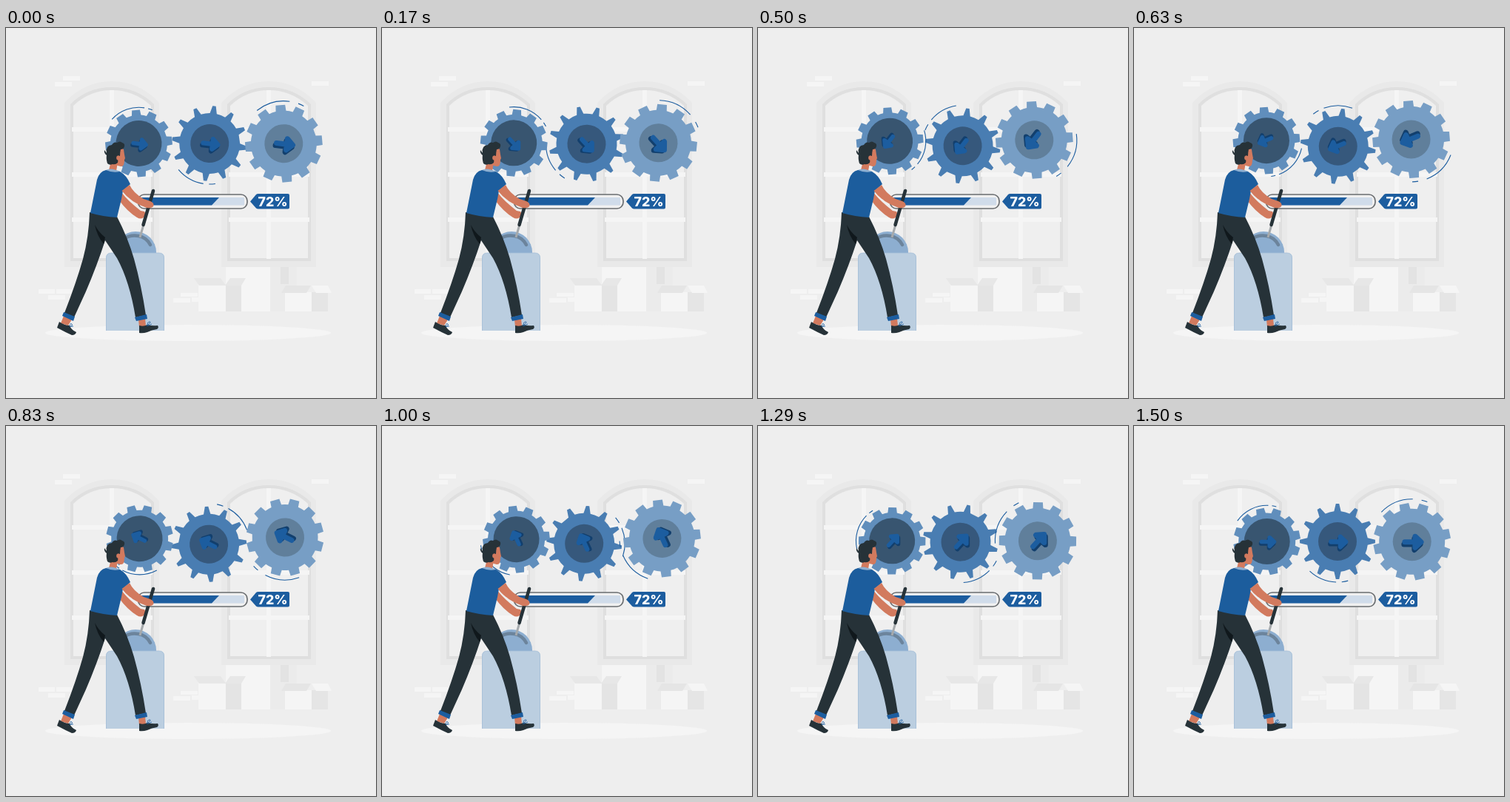
An HTML page that plays this animation: 500x500 px, repeating every 1.54 s.

```html
<!DOCTYPE html>
<html lang="en">
<head>
<meta charset="utf-8">
<title>Loading gears</title>
<style>
  html, body { margin: 0; height: 100%; overflow: hidden; background: #eee; }
  svg { display: block; width: 100vw; height: 100vh; }
  text { font: 800 17.8px Inter, "Open Sans", sans-serif; }
</style>
</head>
<body>
<svg viewBox="0 0 500 500">
  <defs>
    <g id="window">
      <path fill="#e9e9e9" d="M79 323V101Q106 72 143 72T207 101V323Z"/>
      <path fill="#dfdfdf" d="M87 315V103Q110 80 143 80T200 103V315Z"/>
      <path fill="#efefef" d="M91 311V105Q113 84 143 84T196 105V311Z"/>
      <path fill="none" stroke="#f5f5f5" stroke-width="6" d="M143 84V312M89 137H198M89 198H198M89 259H198"/>
    </g>
    <path id="arrow" fill="none" stroke-width="6.5" stroke-linecap="round" stroke-linejoin="round"
      d="M-10 0H9M3 -7L10.5 0L3 7Z"/>
  </defs>

  <path fill="#f5f5f5" d="M77 65h23v6h-23zM66 73h23v6h-23zM413 72h23v6h-23zM44 353h22v6h-22zM68 353h22v6h-22zM57 361h23v6h-23zM236 358h23v5h-23zM226 365h23v6h-23zM251 364h9v6h-9z"/>
  <use href="#window"/>
  <use href="#window" x="212"/>
  <ellipse cx="246" cy="412" rx="193" ry="11" fill="#f5f5f5"/>

  <g fill="#f5f5f5">
    <path d="M297 323H357V383H297Z"/>
    <path fill="#ebebeb" d="M357 323H393V383H357Z"/>
    <path fill="#e3e3e3" d="M371 323H382V346H371Z"/>
    <path d="M260 347H297V383H260Z"/>
    <path fill="#e4e4e4" d="M297 347H318V383H297Z"/>
    <path fill="#e7e7e7" d="M254 338H290L297 348H261ZM303 338H324L318 348H296Z"/>
    <path d="M377 357H413V383H377Z"/>
    <path fill="#e5e5e5" d="M413 357H435V383H413ZM378 348H412L406 358H372Z"/>
    <path d="M413 348H435L440 358H419Z"/>
  </g>

  <g id="gears"></g>

  <rect x="178.500" y="225" width="147.500" height="19" rx="8.500" fill="#f0f0f0" stroke="#6a6d70" stroke-width="1.700"/>
  <rect x="183" y="229" width="139" height="10.500" rx="1" fill="#d0dcea"/>
  <path fill="#1c5d9f" d="M183 229H288L278 239.500H183Z"/>
  <path fill="#1c5d9f" d="M330 234.500L338 225Q339 224 341 224H381Q383 224 383 226V242.500Q383 244.500 381 244.500H341Q339 244.500 338 243.500Z"/>
  <text x="360.500" y="240.800" text-anchor="middle" fill="#fff">72%</text>

  <circle cx="175" cy="303" r="28" fill="#8daed0"/>
  <path d="M159 285Q168 279 179 281Q190 283 195 293" fill="none" stroke="#6c849c" stroke-width="4.500" stroke-linecap="round"/>
  <path fill="#bbcee0" d="M135 409V311Q135 304 142 304H207Q214 304 214 311V409Z"/>
  <path d="M135.500 409V311Q135.500 304 142 304H207Q213.500 304 213.500 311V409" fill="none" stroke="#a5bed7" stroke-width=".8"/>
  <path d="M181 283L187 262" stroke="#a5a9ac" stroke-width="3"/>

  <g fill="#d27a5e">
    <path d="M156 222Q164 233 182 247L187 248Q190 252 186 256Q182 259 177 256Q164 248 153 233Z"/>
    <path d="M185.500 266L199 220" stroke="#263238" stroke-width="4.500" stroke-linecap="round"/>
    <path d="M78 389L89 394L84 402L74 399ZM179 394L188 392L189 403L180 404Z"/>
    <path fill="#263238" d="M72 397Q79 402 86 402Q88 408 95 411Q94 415 89 415Q80 411 69 405ZM180 402Q186 404 191 401Q198 403 205 402Q207 405 204 407Q197 408 191 411Q185 413 180 412Z"/>
    <path d="M86 402q1-4 3-2t-2 3t4 0M191 401q0-4 3-4t-2 4t5-1" fill="none" stroke="#1c5d9f" stroke-width=".8"/>
    <path fill="#263238" d="M113 249L150 255Q165 284 173 312Q183 348 189 388L175 391Q167 342 150 311L134 287Q123 321 108 356L92 391L79 385Q95 344 104 312Q112 282 113 249Z"/>
    <path fill="#10181c" d="M120 266Q125 276 134 283L132 292Q123 281 120 266Z"/>
    <path fill="#1c5d9f" d="M78 384L93 390L91 396L76 389ZM174 391L190 387L191 393L176 396Z"/>
    <path d="M142 180L151 182L149 193L139 192Z"/>
    <path d="M148 166Q154 159 159 164L160 171L161 176L160 178Q160 188 155 187Q151 187 148 184Z"/>
    <path fill="#263238" d="M137 183Q135 176 136 172Q132 169 133 165L136 169Q134 159 143 158Q146 153 150 155Q154 152 157 155Q161 156 160 160Q159 164 155 164Q154 168 154 173Q150 171 150 176Q152 178 151 182Q148 185 144 184Q140 186 137 183Z"/>
    <ellipse cx="151.500" cy="175.500" rx="2.300" ry="3"/>
    <path fill="#1c5d9d" d="M135 192Q126 194 123 205L114 250Q131 255 150 256L156 231L158 220L168 211Q163 199 154 194Q145 191 135 192Z"/>
    <path fill="#8daed0" d="M135 192Q142 188 154 194Q144 196 135 192Z"/>
    <path d="M156.500 220L167 212Q172 223 186 231L195 234Q200 236 199.500 240Q198 244 190 243Q169 236 156.500 220Z"/>
  </g>
</svg>

<script>
const point = (r, deg) => {
  const a = deg * Math.PI / 180;
  return `${(r * Math.cos(a)).toFixed(2)} ${(r * Math.sin(a)).toFixed(2)}`;
};
const arc = (r, from, to) => `M${point(r, from)}A${r} ${r} 0 0 1 ${point(r, to)}`;

// Twelve tapered teeth; base and tip are half-widths in degrees.
function gearPath({ root, outer, base, tip, phase }) {
  let d = "";
  for (let i = 0; i < 12; i++) {
    const a = i * 30 + phase;
    d += `${i ? `A${root} ${root} 0 0 1 ` : "M"}${point(root, a - base)}`;
    d += `L${point(outer, a - tip)}L${point(outer, a + tip)}L${point(root, a + base)}`;
  }
  return d + "Z";
}

// dy is how far the wheel sits off its pivot, which makes it wobble.
const gears = [
  { x: 275, y: 158, dy: -2, root: 41, outer: 51, base: 6.5, tip: 2.5, phase: 0, hub: 26, size: .97,
    body: "#497db2", inner: "#36587c", arcR: 55, arcs: [[92, 133], [75, 84]] },
  { x: 179.7, y: 154, dy: 2, root: 38.5, outer: 45.5, base: 9.3, tip: 6.8, phase: -12, hub: 31, size: .84,
    body: "#608ebc", inner: "#385570", arcR: 48.7, arcs: [[215, 272], [278, 285]] },
  { x: 375.7, y: 153.2, dy: 3, root: 44.5, outer: 52.5, base: 9, tip: 7, phase: -12, hub: 26, size: 1.08,
    body: "#779ec5", inner: "#607f9b", arcR: 57.5, arcs: [[224, 271], [283, 291]] }
];

const layer = document.getElementById("gears");
layer.innerHTML = gears.map(g => `<g>
  <path d="${gearPath(g)}" fill="${g.body}"/>
  <circle r="${g.hub}" fill="${g.inner}"/>
  <g transform="translate(1 .5) scale(${g.size})">
    <use href="#arrow" x="-1" y="3" stroke="#123f6d"/>
    <use href="#arrow" stroke="#1c5d9f"/>
  </g>
  <path d="${g.arcs.map(a => arc(g.arcR, ...a)).join("")}" fill="none" stroke="#1c5d9f" stroke-width="1.1"/>
</g>`).join("");

const LOOP = 1540, FPS = 24;

function draw(now) {
  const step = Math.floor((now % LOOP + 3.4) * FPS / 1000) % 37;
  const p = step / 36;
  const angle = 7 + 353 * p + 14 * p * (1 - p);
  gears.forEach((g, i) => layer.children[i].setAttribute("transform",
    `translate(${g.x} ${g.y}) rotate(${angle}) translate(0 ${g.dy})`));
  requestAnimationFrame(draw);
}
draw(0);
</script>
</body>
</html>
```
